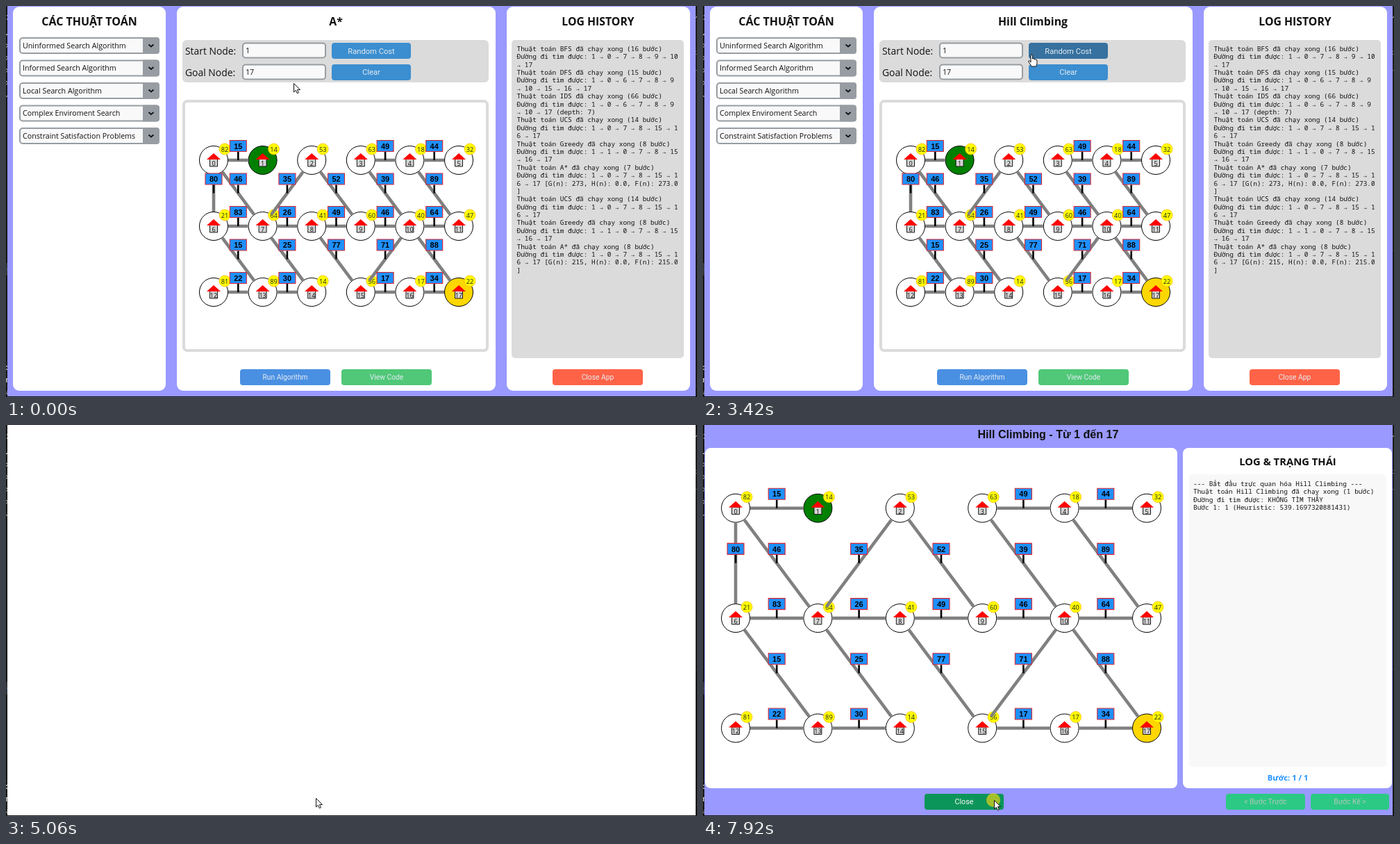
Animation, 995 px wide and 563 px high, one loop 8000 ms. Source, as an HTML page with a canvas:

```html
<!DOCTYPE html>
<html lang="vi">
<head>
<meta charset="utf-8">
<style>
html, body { margin: 0; width: 995px; height: 563px; overflow: hidden; background: #181818; }
canvas { display: block; }
</style>
</head>
<body>
<canvas id="stage" width="995" height="563"></canvas>
<script>
const c = document.getElementById('stage').getContext('2d');
const LOOP = 8000;
const UI = '"Open Sans", "Noto Sans", sans-serif';
const ROBOTO = 'Roboto, sans-serif';
const ARIAL = '"Liberation Sans", Arial, sans-serif';
const MONO = '"Noto Sans Mono", "DejaVu Sans Mono", monospace';
const PURPLE = '#9999ff', GRAY = '#dbdbdb', BORDER = '#979da2';

// ---------- helpers ----------
function rect(x, y, w, h, fill, r = 0, stroke, lw = 1) {
  c.beginPath();
  c.roundRect(x, y, w, h, r);
  if (fill) { c.fillStyle = fill; c.fill(); }
  if (stroke) { c.strokeStyle = stroke; c.lineWidth = lw; c.stroke(); }
}
function circle(x, y, r, fill, stroke, lw = 1) {
  c.beginPath();
  c.arc(x, y, r, 0, 7);
  if (fill) { c.fillStyle = fill; c.fill(); }
  if (stroke) { c.strokeStyle = stroke; c.lineWidth = lw; c.stroke(); }
}
function path(points, stroke, lw = 1, fill) {
  c.beginPath();
  points.forEach(([x, y]) => c.lineTo(x, y));
  if (fill) { c.closePath(); c.fillStyle = fill; c.fill(); }
  if (stroke) { c.strokeStyle = stroke; c.lineWidth = lw; c.stroke(); }
}
// y is the middle of the capital letters
function text(s, x, y, size, color = '#111', align = 'left', font = UI, weight = 400) {
  c.font = `${weight} ${size}px ${font}`;
  c.fillStyle = color;
  c.textAlign = align;
  c.fillText(s, x, y + size * 0.36);
}
const bold = (s, x, y, size, color = '#111', font = UI) => text(s, x, y, size, color, 'center', font, 700);
function chevron(x, y, w, h, color, lw = 1) {
  path([[x - w, y - h], [x, y + h], [x + w, y - h]], color, lw);
}
function button(b, label, fill, size = 10.3, color = '#e4ebf3') {
  rect(...b, fill, 4);
  text(label, b[0] + b[2] / 2, b[1] + b[3] / 2, size, color, 'center', ROBOTO);
}
const inside = ([x, y, w, h], p) => p.x >= x && p.x < x + w && p.y >= y && p.y < y + h;

// ---------- graph ----------
const heuristics = [82, 14, 53, 63, 18, 32, 21, 64, 41, 60, 40, 47, 81, 89, 14, 56, 17, 22];
const edges = `0-1-15 0-6-80 0-7-46 2-7-35 2-9-52 3-4-49 4-5-44 3-10-39 4-11-89 6-7-83 7-8-26 8-9-49
  9-10-46 10-11-64 6-13-15 7-14-25 8-15-77 10-15-71 10-17-88 12-13-22 13-14-30 15-16-17 16-17-34`
  .split(/\s+/).map(e => e.split('-').map(Number));

function graph(x0, y0, dx, dy) {
  const at = i => [x0 + dx * (i % 6), y0 + dy * Math.floor(i / 6)];
  heuristics.forEach((h, i) => {
    const [x, y] = at(i);
    circle(x, y, 20.5, { 1: '#008000', 17: '#ffd700' }[i] || '#fff', '#000');
    rect(x - 5.5, y - 1.5, 11, 10.5, '#d3d3d3', 0, '#000', 0.9);
    path([[x - 10, y - 1], [x, y - 10], [x + 10, y - 1]], null, 0, '#f00');
    text(i, x, y + 4.6, 9, '#111', 'center');
    circle(x + 16, y - 16, 8, '#ff0', '#ffb000', 0.7);
    text(h, x + 16, y - 15.7, 9.3, '#222', 'center');
  });
  const signs = edges.map(([a, b, cost]) => {
    const [ax, ay] = at(a), [bx, by] = at(b);
    const d = Math.hypot(bx - ax, by - ay), ux = (bx - ax) / d * 21, uy = (by - ay) / d * 21;
    path([[ax + ux, ay + uy], [bx - ux, by - uy]], '#808080', 4.6);
    return [(ax + bx) / 2, (ay + by) / 2, cost];
  });
  for (const [x, y, cost] of signs) {
    path([[x, y - 12], [x, y]], '#000', 2.6);
    rect(x - 12, y - 28.5, 24, 16, '#1e90ff', 0, '#e0242c', 1.1);
    bold(cost, x, y - 20.3, 11, '#000', ARIAL);
  }
}

// ---------- main window ----------
const menus = ['Uninformed Search Algorithm', 'Informed Search Algorithm', 'Local Search Algorithm',
  'Complex Enviroment Search', 'Constraint Satisfaction Problems'];
const menuBox = i => [19, 45.5 + 32.5 * i, 202, 23];
const randomBox = [469, 53, 114, 23], clearBox = [469, 84, 114, 23], runBox = [337, 523, 130, 23];
const popupBox = [19, 137, 138, 70];

const found = 'Đường đi tìm được: ';
const viaBest = '1 → 0 → 7 → 8 → 15 → 16 → 17', viaGreedy = '1 → 1 → 0 → 7 → 8 → 15 → 16 → 17';
const history = [
  ['BFS', 16, '1 → 0 → 7 → 8 → 9 → 10 → 17'],
  ['DFS', 15, '1 → 0 → 6 → 7 → 8 → 9 → 10 → 15 → 16 → 17'],
  ['IDS', 66, '1 → 0 → 6 → 7 → 8 → 9 → 10 → 17 (depth: 7)'],
  ['UCS', 14, viaBest], ['Greedy', 8, viaGreedy],
  ['A*', 7, viaBest + ' [G(n): 273, H(n): 0.0, F(n): 273.0]'],
  ['UCS', 14, viaBest], ['Greedy', 8, viaGreedy],
  ['A*', 8, viaBest + ' [G(n): 215, H(n): 0.0, F(n): 215.0]'],
].flatMap(([name, steps, route]) =>
  [`Thuật toán ${name} đã chạy xong (${steps} bước)`, ...(found + route).match(/.{1,41}/g)]);

function log(lines, x, y) {
  lines.forEach((s, i) => text(s.trim(), x, y + 11.39 * i, 9.45, '#111', 'left', MONO));
}
function field(y, label, value) {
  text(label, 258, y, 13.9);
  rect(341, y - 11, 119, 21, '#f9f9fa', 4, BORDER, 2);
  text(value, 345, y, 10.7);
}
function mainWindow(t, p) {
  rect(2, 0, 991, 562, PURPLE);
  rect(10, 1, 220, 553, '#fff', 9);
  rect(246, 1, 459, 553, '#fff', 9);
  rect(721, 1, 264, 553, '#fff', 9);
  bold('CÁC THUẬT TOÁN', 120, 22.5, 16);
  bold(t < 2670 ? 'A*' : 'Hill Climbing', 475, 22.5, 15.8);
  bold('LOG HISTORY', 852.5, 22.5, 15.8);

  menus.forEach((name, i) => {
    const y = 57 + 32.5 * i;
    rect(20, y - 11, 200, 22, '#f9f9fa', 4, BORDER, 2);
    rect(197, y - 12, 24, 24, BORDER, [0, 4, 4, 0]);
    chevron(209, y, 3.5, 1.5, '#111', 1.8);
    text(name, 24, y, 10.7);
  });

  rect(254, 49, 441, 61, GRAY, 6);
  field(64.5, 'Start Node:', '1');
  field(95.5, 'Goal Node:', '17');
  const blue = b => inside(b, p) ? '#36719f' : '#3b8ed0';
  button(randomBox, 'Random Cost', blue(randomBox), 11.2);
  button(clearBox, 'Clear', blue(clearBox), 11);
  rect(256, 137, 437, 359, '#fff', 5, GRAY, 4);
  graph(299, 222, 70.6, 95);

  button(runBox, 'Run Algorithm', inside(runBox, p) ? '#357abd' : '#4a90e2');
  button([483, 523, 130, 23], 'View Code', '#50c878');
  button([787, 523, 130, 23], 'Close App', '#ff6347');
  rect(728, 49, 248, 458, GRAY, 5);
  log(history, 735.5, 61.5);

  if (t >= 2110 && t < 2670) popup(p);
}
function popup(p) {
  rect(19.5, 137.5, 137, 69, '#e5e5e5', 0, '#a3a3a3');
  ['Hill Climbing', 'Simulated Annealing', 'Genetic'].forEach((name, i) => {
    const y = 150.5 + 22 * i;
    if (inside([21, y - 11, 134, 22], p)) rect(21, y - 11, 134, 22, '#bfbfbf');
    text(name, 38, y, 10);
  });
}

// ---------- result window ----------
const closeBox = [319, 531, 114, 23];
const resultTitle = () => bold('Hill Climbing - Từ 1 đến 17', 497, 13, 16.1, '#111', ARIAL);

function opening(t) {
  rect(2, 0, 991, 562, '#fff');
  if (t < 5120) return;
  rect(2, 32, 991, 530, PURPLE);
  rect(3, 32, 709, 530, '#fff', 8);
  rect(720, 32, 273, 530, '#fff', 8);
  rect(396, 2, 202, 22, PURPLE);
  resultTitle();
  bold('LOG & TRẠNG THÁI', 856, 52.5, 14.8);
  graph(47, 131.3, 124, 166.4);
}
function resultWindow(t, p) {
  rect(2, 0, 991, 562, PURPLE);
  resultTitle();
  rect(3, 33, 680, 490, '#fff', 8);
  rect(691, 33, 301, 490, '#fff', 8);
  bold('LOG & TRẠNG THÁI', 842, 52.5, 14.8);
  rect(700, 71, 284, 421, '#f8f8f8', 5);
  const lines = ['--- Bắt đầu trực quan hóa Hill Climbing ---',
    'Thuật toán Hill Climbing đã chạy xong (1 bước)',
    found + 'KHÔNG TÌM THẤY', 'Bước 1: 1 (Heuristic: 539.1697320881431)'];
  log(lines.slice(0, t < 5250 ? 0 : t < 5780 ? 3 : 4), 706, 84.5);
  bold(`Bước: ${t < 5780 ? 0 : 1} / 1`, 842, 508, 11.2, '#1e90ff');
  graph(47, 119.7, 118.4, 158.4);
  button(closeBox, 'Close', inside(closeBox, p) ? '#0c955a' : '#2cc985', 10.8, '#fafafa');
  button([753, 531, 114, 23], '< Bước Trước', '#2cc985', 10.3, '#b4c6bd');
  button([875, 531, 113, 23], 'Bước Kế >', '#2cc985', 10.3, '#b4c6bd');
}

// ---------- desktop: code editor and file list ----------
const treeNames = ['MenuLis', 'Downloa', '6thutuc', '4720915', 'Baitap_', 'Module', '__pyc', 'Cente', 'Comp',
  'CSP.p', 'Graph', 'Graph', 'Infor', 'Local', 'RunC', 'UICor', 'Uninf', 'ViewC', 'Baita'];

function editor() {
  const ink = '#ccc';
  rect(0, 0, 995, 563, '#181818');
  rect(226, 12, 769, 340, '#1f1f1f');
  for (const x of [225, 343, 498, 628, 788]) rect(x, 0, 1, x > 225 ? 12 : 547, '#2b2b2b');
  rect(343, 1, 155, 1.5, '#0078d4');
  text('EXPLORER', -5, 16.5, 9.7, ink);
  text('UNTITLED (', -3, 39, 9.7, ink, 'left', UI, 700);
  rect(0, 370, 225, 18, '#37373d');
  treeNames.forEach((name, i) => {
    const y = 57 + 17.9 * i, last = i === 18;
    if (i < 7) {
      const x = i < 5 ? 1 : i < 6 ? 7 : 13;
      if (i === 4 || i === 5) chevron(x, y, 3.5, 2, ink);
      else path([[x - 2, y - 3.5], [x + 2, y], [x - 2, y + 3.5]], ink);
    } else circle(last ? 6 : 13, y, 4.5, '#3b7fb5');
    text(name, last || i === 5 ? 16 : i < 5 ? 9 : 23, y, 10.5, i ? ink : '#6fb9a6');
  });
  [['OUTLINE', 520.5], ['TIMELINE', 538.5]].forEach(([s, y]) => {
    rect(0, y - 9, 225, 1, '#2b2b2b');
    text(s, -2, y, 9.3, ink, 'left', UI, 700);
  });

  path([[976, 11], [985, 16.5], [976, 22]], ink, 1);
  path([[976, 22], [976, 11]], ink, 1);
  chevron(993, 16, 2, 1, ink);
  for (let i = 0; i < 34; i++)
    rect(960 + i * 7 % 5, 46 + i * 2.1, 10 + i * 13 % 24, 1, ['#68786a', '#4d6a80', '#77654f'][i % 3]);
  rect(959, 352, 36, 1, '#2b2b2b');
  rect(957.5, 362, 6, 9, null, 1, ink);
  text('···', 974, 366, 12, ink);
  text('ction,', 957, 443, 9.45, ink, 'left', MONO);

  const mono = (s, x, y, color) => text(s, x, y, 9.45, color, 'left', MONO);
  mono('-'.repeat(71), 242, 498, ink);
  for (const y of [512, 526]) {
    mono('PS C:\\HOC\\AI\\Baitap_K>', 242, y, ink);
    mono('script', 372.5, y, '#f0e64a');
    mono('-u', 412.2, y, '#8c8c8c');
    mono('"c:\\HOC\\AI\\Baitap_K\\Baitap_Main_Demo1.py"', 429.2, y, '#29a3db');
  }
  rect(242.5, 533.5, 4.5, 12, null, 0, ink);

  rect(0, 547, 995, 1, '#2b2b2b');
  [['aitap_K', 0], ['dev*', 54], ['0', 116], ['0', 138], ['kvm3184 (2 days ago)', 525], ['Ln 42, Col 11', 628],
    ['Spaces: 4', 696], ['UTF-8', 749], ['CRLF', 788], ['{ }', 823], ['Script', 838], ['Script 3.12 (64-bit)', 906]]
    .forEach(([s, x]) => text(s, x, 556, 9.6, ink));
  path([[45, 552], [45, 560], [45, 557], [49, 555], [49, 552]], ink);
  circle(85, 556, 4, null, ink);
  circle(109, 556, 4, null, ink);
  path([[107, 554], [111, 558]], ink);
  path([[127, 560], [131, 552], [135, 560], [127, 560]], ink);
  path([[517, 551], [517, 561]], ink);
  circle(517, 556, 2.5, '#181818', ink);
  circle(887, 556, 5, ink);
}

const BLUE = '#1683d8', YELLOW = '#f8d775';
const folder = (x, y) => {
  rect(x - 5, y - 6, 6, 3, '#e8b84c');
  rect(x - 5, y - 5, 11, 11, YELLOW);
};
const icons = {
  folder,
  star: (x, y) => {
    const pts = [...Array(10)].map((_, i) => {
      const r = i % 2 ? 2.4 : 5.8, a = i * Math.PI / 5;
      return [x + r * Math.sin(a), y - r * Math.cos(a)];
    });
    path(pts, null, 0, BLUE);
  },
  screen: (x, y) => rect(x - 5.5, y - 4.5, 12, 9, '#1aa0e8', 0, '#0c6fb5'),
  down: (x, y) => path([[x - 2, y - 6], [x + 2, y - 6], [x + 2, y], [x + 6, y], [x, y + 6], [x - 6, y], [x - 2, y]], null, 0, '#3c8bd0'),
  doc: (x, y) => {
    rect(x - 4.5, y - 5.5, 9, 11, '#fff', 0, '#8a9aa8');
    for (const d of [-3, 0, 3]) rect(x - 3, y + d - 0.5, 6, 1.2, '#3c8bd0');
  },
  picture: (x, y) => {
    rect(x - 5.5, y - 4.5, 11, 9, '#fff', 0, '#8a9aa8');
    path([[x - 4, y + 3], [x - 1, y - 1], [x + 4, y + 3]], null, 0, '#2e86c8');
    rect(x - 4, y - 3, 8, 2, '#8fc8ee');
  },
  dot: (x, y) => circle(x, y, 5, BLUE),
  cube: (x, y) => rect(x - 5, y - 5, 10, 10, '#2fa4d0', 2),
  note: (x, y) => {
    circle(x - 1, y + 3, 2.5, BLUE);
    path([[x + 1, y + 3], [x + 1, y - 6], [x + 4, y - 2]], BLUE, 1.5);
  },
};
// icon, name, y, indent
const places = [
  ['star', 'Quick access', 113, 0], ['screen', 'Desktop', 132, 1], ['down', 'Downloads', 152, 1],
  ['doc', 'Documents', 171, 1], ['picture', 'Pictures', 190.5, 1], ['folder', '482', 210, 1],
  ['folder', 'gif', 230, 1], ['folder', 'Baitap_K', 249, 1], ['folder', 'Papers_TXT', 268.5, 1],
  ['dot', 'MistShed', 295, 0], ['dot', 'MistShed', 321, 0], ['screen', 'This PC', 347, 0],
  ['cube', '3D Objects', 366.5, 1], ['screen', 'Desktop', 386, 1], ['doc', 'Documents', 405.5, 1],
  ['down', 'Downloads', 425, 1], ['note', 'Music', 444.5, 1], ['picture', 'Pictures', 464, 1],
];
const files = ['AStar 22:02 657', 'Greedy 21:58 497', 'UCS 21:57 514', 'IDS 21:56 1,032', 'DFS 21:55 420', 'BFS 21:51 517'];

function fileList() {
  const S = 9.4, dim = '#6d6d6d', line = '#dcdcdc';
  rect(48, 12, 911, 480, '#fff');
  // title bar and ribbon
  folder(61, 24);
  rect(74, 18, 1, 12, '#777');
  rect(83.5, 18.5, 9, 12, '#fff', 0, '#777');
  path([[85, 24], [87, 27], [91, 21]], '#333', 1.3);
  folder(106, 24);
  path([[117, 23], [123, 23], [120, 27]], null, 0, '#222');
  rect(130, 18, 1, 12, '#777');
  rect(234, 14, 77, 23, '#f4ef86');
  rect(234, 37, 77, 18, '#fbfaf0');
  text('Manage', 271.5, 26.5, S, '#333', 'center');
  text('gif', 322, 24.5, S, '#888');
  path([[863, 24], [871, 24]], '#555');
  rect(899.5, 19.5, 8, 8, null, 0, '#555');
  path([[936, 19], [945, 28]], '#555');
  path([[945, 19], [936, 28]], '#555');
  rect(48, 37, 45, 18, '#0063b1');
  text('File', 70.5, 46.5, S, '#fff', 'center');
  [['Home', 117], ['Share', 164], ['View', 209.5], ['Picture Tools', 271.5]]
    .forEach(([s, x]) => text(s, x, 46.5, S, '#222', 'center'));
  rect(48, 55, 911, 1, '#e4e4e4');
  chevron(932, 45.5, 3, 1.5, '#666');
  circle(950, 45.5, 6, '#0063b1');
  bold('?', 950, 45.5, 9, '#fff');
  // address row
  const arrow = (x, y, turn, color) => {
    c.save();
    c.translate(x, y);
    c.rotate(turn);
    path([[5, 0], [-5, 0], [-1, -4]], color, 1.2);
    path([[-5, 0], [-1, 4]], color, 1.2);
    c.restore();
  };
  arrow(63, 72, 0, '#444');
  arrow(87, 72, Math.PI, '#c4c4c4');
  chevron(106.5, 72, 2, 1, '#777');
  arrow(123, 72, Math.PI / 2, '#444');
  rect(134.5, 60.5, 528, 23, '#fff', 0, line);
  rect(637, 61, 1, 23, line);
  folder(143, 72);
  for (const x of [156, 208, 274]) path([[x - 1, 70], [x + 1, 72.5], [x - 1, 75]], '#444');
  [['This PC', 166], ['Downloads', 216], ['gif', 283]].forEach(([s, x]) => text(s, x, 72.5, S));
  chevron(626, 72.5, 3.5, 2, '#444', 1.3);
  c.beginPath();
  c.arc(650, 72.5, 3.5, 0, 5);
  c.stroke();
  path([[649, 67], [653, 69], [650, 71]], null, 0, '#444');
  rect(672.5, 60.5, 276, 23, '#fff', 0, line);
  circle(690, 70.5, 3, null, '#888');
  path([[688, 73], [684, 77]], '#888');
  text('Search gif', 705, 72.5, S, dim);
  // side list
  rect(48, 415, 113, 19, '#d9d9d9');
  places.forEach(([icon, name, y, indent], i) => {
    icons[icon](74 + 6 * indent, y);
    text(name, 84 + 7 * indent, y, S);
    if (i > 0 && i < 5) {
      path([[150, y + 4], [154, y]], '#888');
      path([[152, y - 2], [156, y + 2], [157, y - 1], [154, y - 4], [152, y - 2]], '#888');
    }
  });
  rect(162, 91, 12, 384, '#f0f0f0');
  rect(162, 104, 12, 304, '#cdcdcd');
  chevron(168, 98, 3, -1.5, '#444', 1.3);
  chevron(168, 467, 3, 1.5, '#444', 1.3);
  text('6 items', 59, 483.5, S);
  // table
  [['Name', 192], ['Date', 312], ['Type', 443], ['Size', 540], ['Tags', 605]]
    .forEach(([s, x]) => text(s, x, 100.5, S, '#4c607a'));
  for (const x of [307, 437, 534, 599, 671]) rect(x, 91, 1, 20, '#e5e5e5');
  chevron(372, 92.5, 3, 1.5, '#777');
  files.forEach((row, i) => {
    const y = 124 + 17.1 * i, [name, time, size] = row.split(' ');
    rect(194.5, y - 5.5, 9, 11, '#fff', 0, '#888');
    rect(196, y - 2, 6, 5, '#2e86c8');
    text(name + '.gif', 208.5, y, S);
    text('10/15/2025 ' + time, 312, y, S, dim);
    text('GIF File', 443, y, S, dim);
    text(size + ' KB', 593, y, S, dim, 'right');
  });
  rect(920.5, 474.5, 17, 16, '#cce8ff', 0, '#26a0da');
  for (const y of [478, 482, 486]) {
    rect(924, y, 4, 2, '#555');
    rect(930, y, 5, 1, '#555');
  }
  icons.picture(947, 482);
}

// ---------- pointer ----------
const track = [[0, 414, 111], [730, 414, 111], [930, 427, 138], [1120, 385, 157], [1500, 218, 93], [1630, 218, 93],
  [1840, 218, 119], [2110, 218, 119], [2390, 132, 154], [2530, 123, 157], [2930, 123, 157], [3130, 240, 130],
  [3430, 480, 68], [3540, 520, 85], [3690, 484, 160], [3770, 484, 160], [4080, 472, 330], [4390, 446, 537],
  [7510, 446, 537], [7720, 419, 540], [LOOP, 419, 540]];
const clicks = [[2040, 2110], [2600, 2670], [4980, 5060], [7920, LOOP]];

function pointerAt(t) {
  const i = track.findIndex(k => k[0] > t);
  const [t0, x0, y0] = track[i - 1], [t1, x1, y1] = track[i];
  const k = (t - t0) / (t1 - t0);
  return { x: x0 + (x1 - x0) * k, y: y0 + (y1 - y0) * k };
}
function isHand(t, p) {
  if (t >= 4980) return t < 7920 && inside(closeBox, p);
  if (t >= 2110 && t < 2670 && inside(popupBox, p)) return false;
  return [randomBox, clearBox, runBox, ...menus.map((_, i) => menuBox(i))].some(b => inside(b, p));
}
function pointer(t, p) {
  if (clicks.some(([a, b]) => t >= a && t < b)) circle(p.x - 1, p.y, 10, 'rgba(245, 215, 20, 0.65)');
  c.save();
  c.translate(Math.round(p.x), Math.round(p.y));
  c.lineJoin = 'round';
  const shape = isHand(t, p)
    ? 'M-1 1Q0-1 1.5 1V6Q3 5 4 6.5Q5.5 6 6 7.5Q8 7 8 9V12Q8 14 6.5 17H0Q-1-0 -1 1M0 17Q-2 13-4.5 10Q-4-0-4 9Q-2.500 8-1 11V1Q0-1 1.5 1V6Q3 5 4 6.5Q5.5 6 6 7.5Q8 7 8 9V12Q8 14 6.5 17Z'
    : 'M0.500 0.500V13L3.400 10.400L5.300 14.800L7.400 13.900L5.500 9.600H9.500Z';
  const p2d = new Path2D(isHand(t, p)
    ? 'M0 17Q-2 13-4.500 10Q-4 8-2.500 9L-1 11V1Q0-0.500 1.500 1V6Q3 5 4 6.500Q5.500 6 6 7.500Q8 7 8 9V12Q8 14 6.500 17Z'
    : shape);
  c.fillStyle = '#fff';
  c.strokeStyle = '#111';
  c.lineWidth = 1;
  c.fill(p2d);
  c.stroke(p2d);
  c.restore();
}

// ---------- loop ----------
function draw(t) {
  const p = pointerAt(t);
  editor();
  if (t < 4980) mainWindow(t, p);
  else if (t < 5060) fileList();
  else if (t < 5180) opening(t);
  else resultWindow(t, p);
  pointer(t, p);
}
const start = performance.now();
(function frame() {
  draw((performance.now() - start) % LOOP);
  requestAnimationFrame(frame);
})();
</script>
</body>
</html>
```
